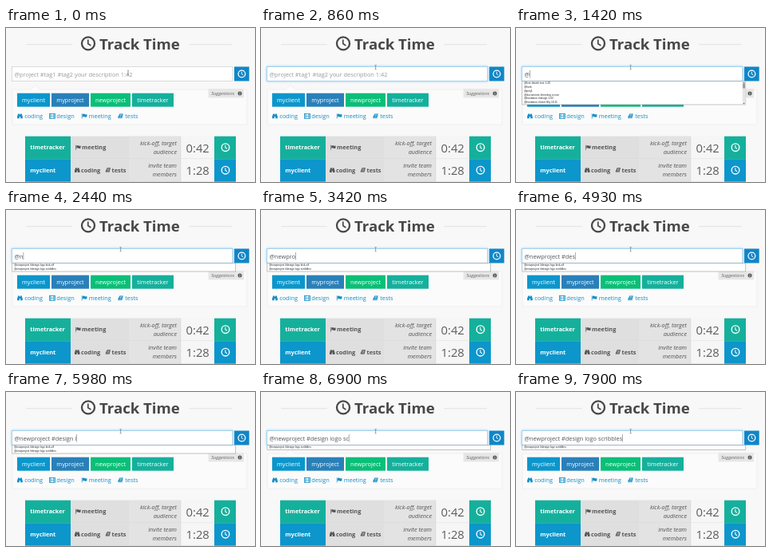
Animation, 312 px wide and 193 px high, one loop 8000 ms. Source, as an HTML page:

```html
<!DOCTYPE html>
<html lang="en">
<head>
<meta charset="utf-8">
<title>Track Time</title>
<style>
  html, body { margin: 0; width: 100%; height: 100%; overflow: hidden; background: #f8f8f8; }
  svg { display: block; width: 100%; height: 100%; }
  text { font-family: "Open Sans", sans-serif; font-size: 7.35px; white-space: pre; }
  .tiny text { font-family: "Liberation Sans", Arial, sans-serif; font-size: 3.3px; fill: #222; }
</style>
</head>
<body>
<svg id="stage" viewBox="0 0 312 193" xmlns="http://www.w3.org/2000/svg">
  <defs>
    <filter id="blur" x="-5%" y="-40%" width="110%" height="180%"><feGaussianBlur stdDeviation="1"/></filter>
    <g id="clock" fill="none" stroke="currentColor">
      <circle r="8" stroke-width="2.3"/>
      <path d="M-.2 -5V.4L3.4 2.6" stroke-width="1.7"/>
    </g>
    <g id="coding" fill="currentColor">
      <path d="M1.2 .8H2.9V2H3.9V.8H5.6L6.8 4.4V6.7H4V4.4H2.8V6.7H0V4.4Z"/>
    </g>
    <g id="design" fill="none" stroke="currentColor">
      <rect x=".4" y=".9" width="7" height="5.8" stroke-width=".8"/>
      <path d="M2.1 1V6.6M5.7 1V6.6M2.1 3.8H5.7" stroke-width=".7"/>
      <path d="M1.2 1V6.6M6.6 1V6.6" stroke-width=".7" stroke-dasharray=".7 .6"/>
    </g>
    <g id="meeting" fill="currentColor">
      <path d="M.3 .6H1V7H.3ZM1.4 1.5Q2.9 .5 4.2 1.4T6.9 1.2V4.7Q5.5 5.6 4.2 4.8T1.4 4.9Z"/>
    </g>
    <g id="tests" fill="currentColor">
      <path fill-rule="evenodd" d="M2.3 .8H6.8L5.3 6.6H.9Q0 6.3 .3 5.2ZM2.8 2L2.6 2.7H5.2L5.4 2ZM2.4 3.4L2.2 4H4.8L5 3.4ZM1.2 5.4V5.9H4.8L5 5.4Z"/>
    </g>
  </defs>

  <g id="page"></g>

  <g id="field">
    <rect id="glow" x="7.5" y="48.5" width="276.5" height="18" rx="1.5" fill="none" stroke="#a6d6f3" stroke-width="2" filter="url(#blur)"/>
    <rect x="7.5" y="48.5" width="276.5" height="18" fill="#fff" stroke="#d4d4d4" stroke-width=".8"/>
    <rect id="ring" x="7.5" y="48.5" width="276.5" height="18" fill="none" stroke="#a2d2ef" stroke-width=".9"/>
    <text id="hint" x="10.5" y="60.6" fill="#999">@project #tag1 #tag2 your description 1:42</text>
    <text id="typed" x="10.5" y="60.6" fill="#555"></text>
    <rect id="caret" y="53" width=".6" height="9.6" fill="#777"/>
  </g>

  <g id="list" class="tiny">
    <rect id="listBox" x="7.8" y="66.8" width="280" fill="#fff" stroke="#888" stroke-width=".5"/>
    <g id="rows"></g>
    <g id="scrollbar">
      <rect x="283.6" y="67.4" width="4" height="28.4" fill="#e6e6e6"/>
      <rect x="284.2" y="69.5" width="2.8" height="6" fill="#999"/>
      <path d="M284.5 69L285.6 67.8L286.7 69ZM284.5 94L285.6 95.2L286.7 94Z" fill="#555"/>
    </g>
  </g>

  <path id="pointer" d="M-1 -2.7Q0 -2.7 0 -2.1Q0 -2.7 1 -2.7M0 -2.1V2.1M-1 2.7Q0 2.7 0 2.1Q0 2.7 1 2.7" fill="none" stroke="#555" stroke-width=".55"/>
</svg>

<script>
const $ = id => document.getElementById(id);

const rect = (x, y, w, h, fill, extra = "") =>
  `<rect x="${x}" y="${y}" width="${w}" height="${h}" fill="${fill}" ${extra}/>`;
const label = (x, y, str, fill, extra = "") =>
  `<text x="${x}" y="${y}" fill="${fill}" ${extra}>${str}</text>`;
const icon = (name, x, y, color, scale = 1) =>
  `<use href="#${name}" transform="translate(${x} ${y}) scale(${scale})" color="${color}"/>`;

const BLUE = "#0c96cb", TEAL = "#15b09c", INK = "#555";
const BOLD = 'font-weight="700"';

function heading() {
  return rect(25, 20.4, 58, .8, "#ddd") + rect(229, 20.4, 54, .8, "#ddd") +
    icon("clock", 103, 19.4, "#484848") +
    label(117, 26.6, "Track Time", "#484848", `${BOLD} style="font-size:18.6px"`);
}

function suggestions() {
  const buttons = [
    ["myclient", 14, 41, BLUE], ["myproject", 57, 47, "#2980b9"],
    ["newproject", 106, 50, "#0abf78"], ["timetracker", 158, 52, TEAL]
  ].map(([name, x, w, color]) =>
    rect(x, 81.7, w, 17, color) +
    label(x + w / 2, 92.8, name, "#fff", 'text-anchor="middle"'));
  const tags = [["coding", 14], ["design", 54], ["meeting", 94.5], ["tests", 140]]
    .map(([name, x]) => icon(name, x, 106.6, "#1490c8") + label(x + 9.2, 113, name, "#1490c8"));
  return `<path d="M8 77H31L36.8 71.5L42.5 77H302V121H8Z" fill="#fbfbfb" stroke="#ececec" stroke-width=".8"/>` +
    rect(253.6, 76.2, 44.4, 11.2, "#e6e6e6") +
    label(257.3, 83.9, "Suggestions", "#666", 'font-style="italic" style="font-size:5.6px"') +
    `<circle cx="293" cy="82" r="2.5" fill="#555"/>` +
    rect(292.6, 80.4, .8, .7, "#fff") + rect(292.6, 81.6, .8, 1.9, "#fff") +
    buttons.join("") + tags.join("");
}

function entry(y, name, color, tags, lines, time) {
  return rect(24, y, 57, 28.5, color) + rect(81, y, 138, 28.5, "#dfdfdf") +
    rect(154, y, 65, 28.5, "#e3e3e3") + rect(219, y, 42, 28.5, "#f6f6f6") +
    rect(261, y, 27, 28.5, color) +
    rect(81, y + 28, 180, .5, "#d2d2d2") + rect(218.7, y, .5, 28.5, "#d2d2d2") +
    label(30.3, y + 16.5, name, "#fff", BOLD) +
    tags.map(([tag, x]) => icon(tag, x, y + 10.4, INK, .95) +
      label(x + 8, y + 16.5, tag, INK, BOLD)).join("") +
    lines.map((line, i) => label(214, y + 10.9 + 11.3 * i, line, INK,
      'text-anchor="end" font-style="italic"')).join("") +
    label(225.5, y + 19.8, time, "#5c5c5c", 'style="font-size:14.8px"') +
    icon("clock", 275, y + 14, "#fff", .6);
}

$("page").innerHTML = heading() + suggestions() +
  rect(286, 48.5, 18.7, 18, "#1086c8") + icon("clock", 295.4, 57.5, "#fff", .55) +
  entry(135.7, "timetracker", TEAL, [["meeting", 87]], ["kick-off, target", "audience"], "0:42") +
  entry(164.2, "myclient", BLUE, [["coding", 86]  , ["tests", 124.5]], ["invite team", "members"], "1:28");

const PHRASE = "@newproject #design logo scribbles";
// [time, number of characters typed]
const KEYS = [
  [1420, 1], [2440, 2], [2560, 4], [2870, 5], [3300, 6], [3420, 7], [3540, 8],
  [3970, 9], [4120, 10], [4270, 11], [4390, 12], [4540, 13], [4690, 14], [4810, 15],
  [4930, 16], [5490, 17], [5610, 18], [5730, 20], [5980, 21], [6100, 22], [6250, 23],
  [6370, 24], [6490, 25], [6630, 26], [6900, 27], [7030, 28], [7180, 29], [7330, 30],
  [7450, 31], [7600, 32], [7750, 33], [7900, 34]
];
const POINTER = [[0, 153, 56], [280, 153.6, 55.6], [430, 152.5, 55], [710, 144.5, 50.2], [860, 143.6, 49.2]];
const HISTORY = ["@lost #dutch test 1:20", "@funk", "@proj1", "@documents #meeting a num",
  "@fundation #design 1:02", "@fundation #meet fifty 10:11"];
const KICKOFF = "@newproject #design logo kick-off";
const LISTS = [
  [0, []], [1420, HISTORY], [2440, [KICKOFF, PHRASE]],
  [6760, [PHRASE, PHRASE]], [6900, [PHRASE]]
];
const HIDDEN_CARET = [[0, 430], [860, 1420], [1880, 2440]];

const latest = (steps, t) => steps.filter(step => step[0] <= t).pop();
const show = (id, on) => $(id).setAttribute("visibility", on ? "visible" : "hidden");

let shownList = null;
function drawList(items) {
  if (items === shownList) return;
  shownList = items;
  $("list").style.display = items.length ? "" : "none";
  $("scrollbar").style.display = items === HISTORY ? "" : "none";
  $("listBox").setAttribute("height", .7 + 4.75 * items.length);
  $("rows").innerHTML = items.map((item, i) => `<text x="10" y="${70.4 + 4.75 * i}">${item}</text>`).join("");
}

function draw(t) {
  const [, count] = latest(KEYS, t) || [0, 0];
  const focus = t < 430 ? 0 : t < 550 ? .55 : 1;
  $("glow").setAttribute("opacity", focus);
  $("ring").setAttribute("opacity", focus);
  show("hint", !count);
  $("typed").textContent = PHRASE.slice(0, count);
  $("caret").setAttribute("x", 10.5 + (count ? $("typed").getComputedTextLength() : 0));
  show("caret", !HIDDEN_CARET.some(([from, to]) => t >= from && t < to));
  drawList(latest(LISTS, t)[1]);
  const [, x, y] = latest(POINTER, t);
  $("pointer").setAttribute("transform", `translate(${x} ${y})`);
}

const start = performance.now();
function tick() {
  draw((performance.now() - start) % 8000);
  requestAnimationFrame(tick);
}
tick();
</script>
</body>
</html>
```
